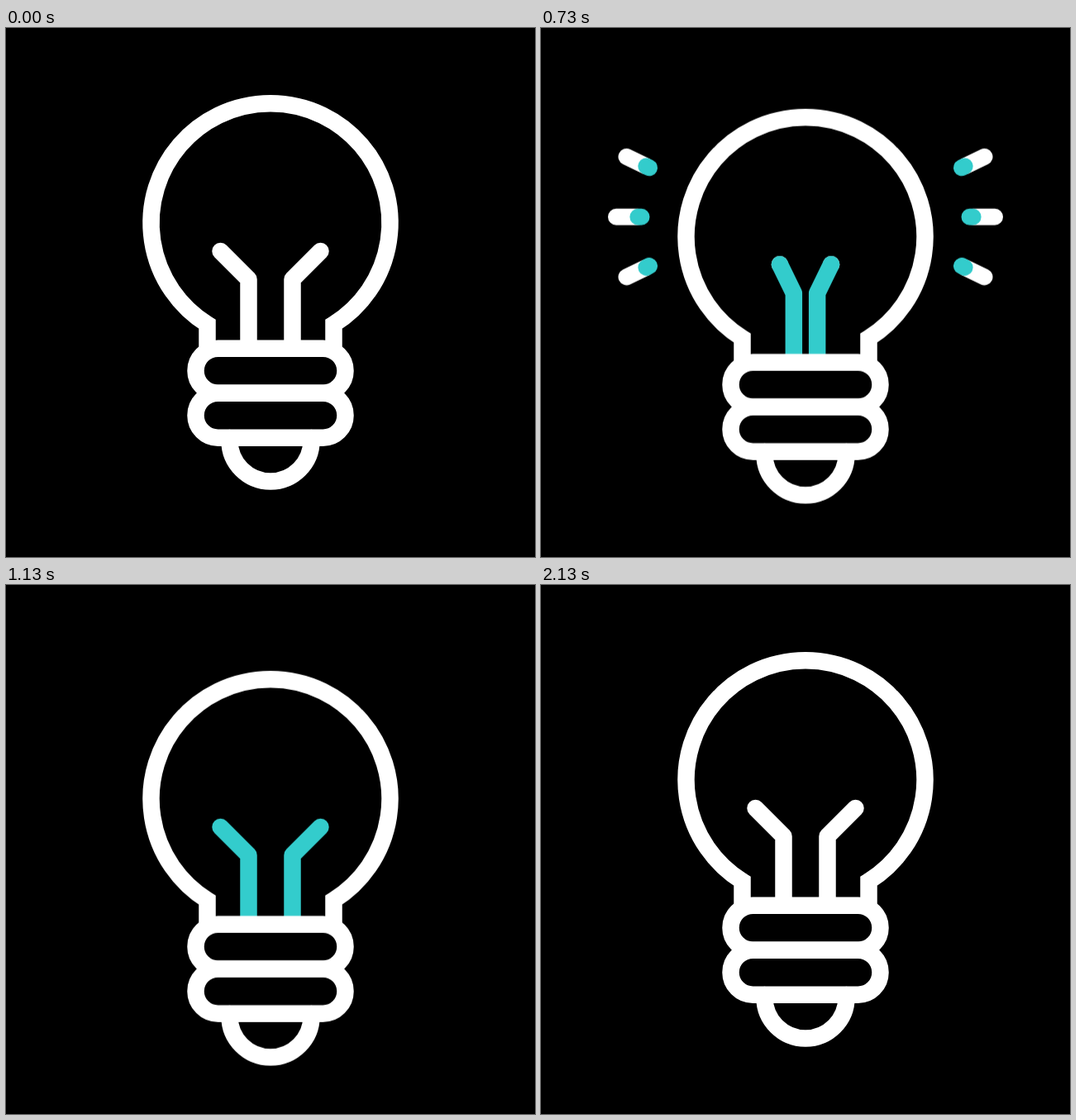
Write an HTML page that moves like this. It is 640x640 px and loops after 2500 ms.

```html
<!DOCTYPE html>
<html lang="en">
<head>
<meta charset="utf-8">
<title>Light bulb</title>
<style>
  html, body { margin: 0; height: 100%; overflow: hidden; background: #000; }
  svg { display: block; width: 100vw; height: 100vh; }

  path, rect {
    fill: none;
    stroke: #fff;
    stroke-width: 20.5px;
    stroke-linecap: round;
    stroke-linejoin: round;
  }
  .glass { stroke-linejoin: miter; }
  .teal { stroke: #3cc; }

  .bulb, .wire, .ray {
    animation: 2500ms cubic-bezier(.3333, 0, .6667, 1) infinite;
  }
  .bulb { animation-name: bounce; }

  /* Every subpath is one unit long; the dash offset trims either end of it. */
  .wire, .ray { stroke-dasharray: 1.01px 9px; }
  .wire {
    d: path("M293.5 387 L293.5 304 L259.5 270 M346.5 387 L346.5 304 L380.5 270");
    animation-name: squeeze, wire-white;
  }
  .wire.teal { animation-name: squeeze, wire-teal; }
  .ray {
    d: path("M131 152.3 L103.5 139 M121.5 211.7 L91 211.7 M131 271.1 L103.5 284.4 M509 152.3 L536.5 139 M518.5 211.7 L549 211.7 M509 271.1 L536.5 284.4");
    stroke-width: 20px;
    animation-name: ray-white;
  }
  .ray.teal { animation-name: ray-teal; }

  @keyframes bounce {
    0%, 16%, 34.133%, 52.267%, 100% { transform: translateY(0); }
    26.667%, 44.8% { transform: translateY(23px); }
  }
  @keyframes squeeze {
    0%, 12.933%, 34.133%, 100% {
      d: path("M293.5 387 L293.5 304 L259.5 270 M346.5 387 L346.5 304 L380.5 270");
    }
    26.667% {
      d: path("M310.5 387 L310.5 304 L300 269 M329.5 387 L329.5 304 L340 269");
    }
  }
  @keyframes wire-white {
    0%, 12.933%, 84.933%, 100% { stroke-dashoffset: 0px; }
    27.467%, 69.733% { stroke-dashoffset: -1px; }
  }
  @keyframes wire-teal {
    0%, 12.933%, 84.933%, 100% { stroke-dashoffset: 1.03px; }
    27.467%, 69.733% { stroke-dashoffset: 0px; }
  }
  @keyframes ray-white {
    0%, 19.333% { stroke-dashoffset: 1.03px; }
    27.333%, 28% { stroke-dashoffset: 0px; }
    33.067%, 100% { stroke-dashoffset: -1.03px; }
  }
  @keyframes ray-teal {
    0%, 28% { stroke-dashoffset: 1.03px; }
    33.067% { stroke-dashoffset: 0px; }
    39.2%, 100% { stroke-dashoffset: -1.03px; }
  }
</style>
</head>
<body>
<svg viewBox="0 0 640 640">
  <g class="bulb">
    <path class="wire" pathLength="2"/>
    <path class="wire teal" pathLength="2"/>
    <path class="ray" pathLength="6"/>
    <path class="ray teal" pathLength="6"/>
    <path class="glass" d="M243.5 387 V358.4 A144.5 144.5 0 1 1 396.5 358.4 V387"/>
    <rect x="229.5" y="387.7" width="181" height="54" rx="27"/>
    <rect x="229.5" y="441.7" width="181" height="54" rx="27"/>
    <path d="M270.5 496 V499 A49.5 49.5 0 0 0 369.5 499 V496"/>
  </g>
</svg>
</body>
</html>
```
